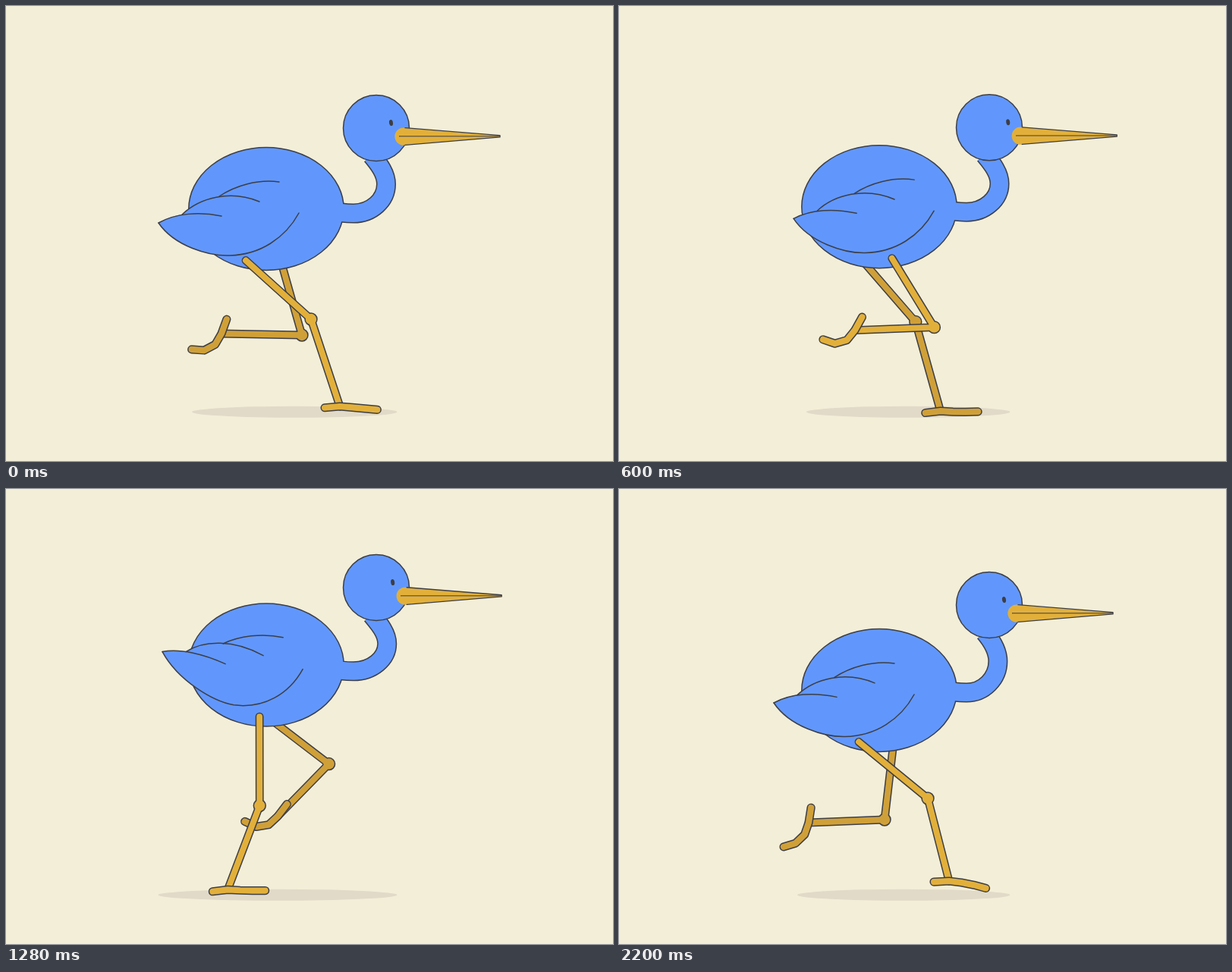
These frames come from a looping animation (800x600 px, 2.24 s). An HTML page with a canvas:

```html
<!DOCTYPE html>
<html lang="en">
<head>
<meta charset="utf-8">
<title>Running bird</title>
<style>
html, body { margin: 0; width: 100%; height: 100%; overflow: hidden; background: #f3eed7; }
canvas { display: block; }
</style>
</head>
<body>
<canvas id="stage" width="800" height="600"></canvas>
<script>
const ctx = document.getElementById('stage').getContext('2d');
const INK = '#3c3e47', BLUE = '#6197fc', NEAR = '#e2b03a', FAR = '#d0a038';
const LOOP = 2240, STRIDE = 1120, STEP = 40, LINE = 1.5;

// Key times of one stride and the values at them
const KEYS = [0, 200, 320, 440, 520, 560, 760, 880, 1000, 1080];
const BODY_Y = [267.5, 225, 221, 249.5, 264, 267.5, 225, 221, 252.5, 265.5];
const HEAD_Y = [161, 123, 120, 135.5, 152, 160, 123, 120, 138, 153];
const TWIST = [1, 0, -.5, -.87, -1, -1, 0, .5, .87, 1];
const WING_X = [386, 394, 404, 413, 416, 416, 406, 399, 393, 389];
const LEG = {
  kneeX: [402, 320, 298, 296, 350, 390, 425, 422, 409, 407],
  kneeY: [413, 415, 399, 422, 436, 434, 349, 339, 383, 408],
  ankleX: [440, 259, 214, 195, 250, 284, 372, 413, 421, 435],
  ankleY: [528, 522, 492, 477, 440, 432, 434, 442, 490, 517],
  tilt: [-5, -3, 22, 63, 99, 110, 119, 58, 6, -3],
  curl: [0, 0, 9, 22, 27, 32, 32, 24, 13, 4]
};
const SHADOW_KEYS = [0, 340, 440, 540, 760, 900, 1000, 1100, 1320, 1460, 1560, 1660, 1880, 2030, 2200];
const SHADOW_X = [245, 139, 156, 240, 176, 140, 164, 240, 185, 139, 159, 240, 208, 140, 235];

// Smooth periodic curve through the points (keys[i], vals[i])
function spline(keys, vals, period, time) {
  const n = keys.length;
  const t = (time % period + period) % period;
  const key = i => keys[(i + n) % n] + period * Math.floor(i / n);
  const val = i => vals[(i + n) % n];
  const slope = i => {
    const a = key(i) - key(i - 1), b = key(i + 1) - key(i);
    return (b * (val(i) - val(i - 1)) / a + a * (val(i + 1) - val(i)) / b) / (a + b);
  };
  let i = n - 1;
  while (keys[i] > t) i--;
  const h = key(i + 1) - key(i), u = (t - key(i)) / h, v = 1 - u;
  return val(i) * (1 + 2 * u) * v * v + val(i + 1) * (3 - 2 * u) * u * u
    + h * u * v * (slope(i) * v - slope(i + 1) * u);
}
const stride = (vals, t) => spline(KEYS, vals, STRIDE, t);

function stroke(path, color = INK, width = LINE) {
  ctx.strokeStyle = color;
  ctx.lineWidth = width;
  ctx.stroke(path);
}
function fill(path, color) {
  ctx.fillStyle = color;
  ctx.fill(path);
}
function ellipse(x, y, rx, ry, turn = 0) {
  const p = new Path2D();
  p.ellipse(x, y, rx, ry, turn, 0, 7);
  return p;
}
function polyline(points) {
  const p = new Path2D();
  points.forEach(([x, y]) => p.lineTo(x, y));
  return p;
}

function drawLeg(t, bodyY, hipX, color) {
  const pose = {};
  for (const part in LEG) pose[part] = stride(LEG[part], t);
  const { kneeX, kneeY, ankleX, ankleY, tilt, curl } = pose;

  const limb = polyline([[hipX, bodyY + 68], [kneeX, kneeY], [ankleX, ankleY]]);
  const knee = ellipse(kneeX, kneeY, 7.2, 7.2);
  stroke(limb, INK, 10.8);
  stroke(knee, INK, 2 * LINE);
  stroke(limb, color, 7.8);
  fill(knee, color);

  const rad = Math.PI / 180;
  let x = ankleX, y = ankleY;
  const points = [[x - 20 * Math.cos(tilt * rad), y - 20 * Math.sin(tilt * rad)], [x, y]];
  for (let i = 0; i < 3; i++) {
    const angle = (tilt + 10 + i * curl) * rad;
    x += 16.5 * Math.cos(angle);
    y += 16.5 * Math.sin(angle);
    points.push([x, y]);
  }
  const foot = polyline(points);
  stroke(foot, INK, 11.2);
  stroke(foot, color, 8.2);
}

function neckPath(bodyY, headY) {
  const stretch = bodyY - headY - 106.5;
  const low = bodyY + 6 - stretch / 2, right = 501 - stretch * .27, mid = headY + 74;
  const p = new Path2D();
  p.moveTo(425, low - 4);
  p.quadraticCurveTo(442, low, 458, low);
  p.bezierCurveTo(458 + .55 * (right - 458), low, right, mid + .55 * (low - mid), right, mid);
  p.bezierCurveTo(right, mid - 14, 492, headY + 48, 482, headY + 36);
  return p;
}

function drawWing(wingX, bodyY) {
  // The wing bends upward, more so towards its tip
  const bend = 2.96e-5 * (267.5 - bodyY);
  const at = (x, y) => [wingX + x - 386, bodyY + y - 267.5 - bend * (x - 386) ** 2];
  const curve = (p, a, b, c) => p.bezierCurveTo(...at(...a), ...at(...b), ...at(...c));
  const start = (x, y) => {
    const p = new Path2D();
    p.moveTo(...at(x, y));
    return p;
  };
  const feather = (from, a, b, c) => {
    const p = start(...from);
    curve(p, a, b, c);
    stroke(p);
  };
  const edge = start(201, 286);
  curve(edge, [222, 317], [268, 330], [295, 329]);
  curve(edge, [335, 328], [368, 306], [386, 273]);

  const area = new Path2D(edge);
  area.lineTo(...at(334, 258));
  curve(area, [295, 242], [255, 253], [232, 275]);
  curve(area, [220, 277], [210, 281], [201, 286]);
  fill(area, BLUE);
  stroke(edge);
  feather([201, 286], [224, 273], [255, 271], [284, 277]);
  feather([232, 275], [255, 253], [295, 242], [334, 258]);
  feather([281, 251], [302, 237], [332, 228], [360, 232]);
}

function drawHead(y, shift) {
  const head = ellipse(488, y, 43.5, 43.5);
  fill(head, BLUE);
  stroke(head);
  fill(ellipse(507.5 + shift, y - 7, 2.5, 4, -.15), INK);

  const x = 524 + shift, tip = 651 + shift, mid = y + 11;
  const beak = polyline([[x + 2, mid - 11.3], [tip, mid - 1.3], [tip, mid + .9], [x + 2, mid + 11.3]]);
  fill(ellipse(x, mid, 11.6, 11.6), NEAR);
  fill(beak, NEAR);
  stroke(beak, INK, 1.3);
  stroke(polyline([[x - 6, mid - .2], [tip, mid - .2]]), INK, 1);
}

function draw(t) {
  const bodyY = stride(BODY_Y, t), headY = stride(HEAD_Y, t), twist = stride(TWIST, t);
  ctx.fillStyle = '#f3eed7';
  ctx.fillRect(0, 0, 800, 600);

  const left = spline(SHADOW_KEYS, SHADOW_X, LOOP, t);
  fill(ellipse((left + 515.5) / 2, 535.3, (515.5 - left) / 2, 7.5), '#e1dac8');

  ctx.lineJoin = ctx.lineCap = 'round';
  drawLeg(t + STRIDE / 2, bodyY, 339 + 23 * twist, FAR);

  const neck = neckPath(bodyY, headY), body = ellipse(343, bodyY, 102.2, 81);
  ctx.lineCap = 'butt';
  stroke(neck, INK, 26);
  fill(body, BLUE);
  stroke(body);
  stroke(neck, BLUE, 23);
  ctx.lineCap = 'round';

  drawWing(stride(WING_X, t), bodyY);
  drawHead(headY, 2.75 * (1 - twist));
  drawLeg(t, bodyY, 339 - 23 * twist, NEAR);
}

const begin = performance.now();
function tick() {
  const t = (performance.now() - begin) % LOOP;
  draw(Math.floor(t / STEP) * STEP);
  requestAnimationFrame(tick);
}
tick();
</script>
</body>
</html>
```
